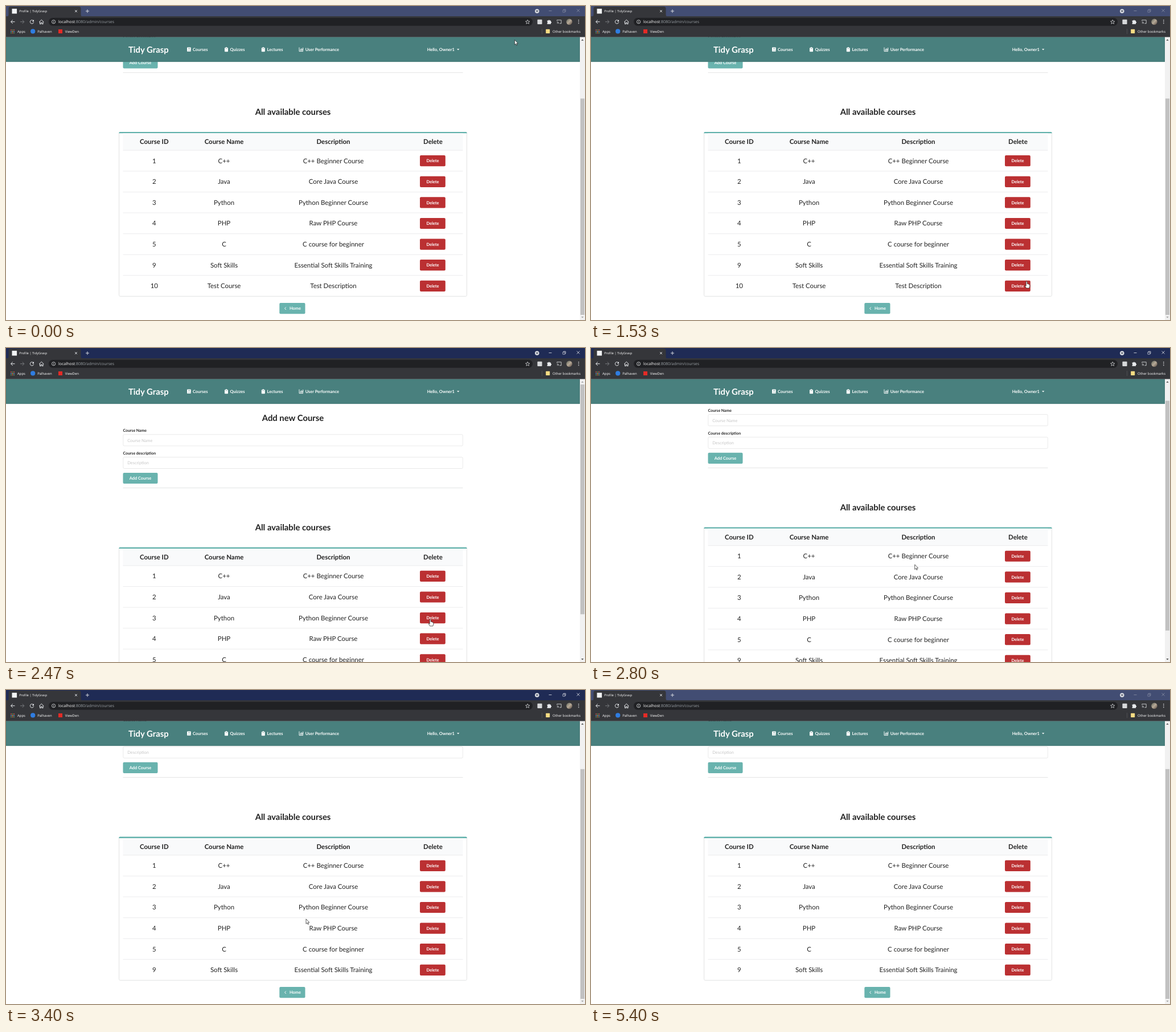
Write an HTML page that moves like this. It is 1017x551 px and loops after 5.54 s.

```html
<!DOCTYPE html>
<html lang="en">
<head>
<meta charset="utf-8">
<title>Course admin</title>
<style>
html, body { margin: 0; width: 100%; height: 100%; overflow: hidden; background: #fff; }
svg { display: block; width: 100%; height: 100%; }
text { font-family: Lato, sans-serif; white-space: pre; text-rendering: geometricPrecision; }
.ui { font-family: "Open Sans", "Noto Sans", sans-serif; }
.b { font-weight: 700; }
.m { text-anchor: middle; }
</style>
</head>
<body>
<svg id="stage" viewBox="0 0 1017 551" xmlns="http://www.w3.org/2000/svg"></svg>
<script>
const LOOP = 5540, FPS = 15;
const ROW = 36.6, HEAD = 381.9, VIEW = 496.5;
const TEAL = '#69b3ae', RED = '#bb3032', DARK_RED = '#a12225', INK = '#212121';
const LOCAL = 'localhost:8080/admin/courses';

const rect = (x, y, w, h, fill, more = '') =>
  `<rect x="${x}" y="${y}" width="${w}" height="${h}" fill="${fill}" ${more}/>`;
const circle = (x, y, r, fill, more = '') =>
  `<circle cx="${x}" cy="${y}" r="${r}" fill="${fill}" ${more}/>`;
const path = (d, fill, more = '') => `<path d="${d}" fill="${fill}" ${more}/>`;
const line = (d, color, w = 1, more = '') =>
  path(d, 'none', `stroke="${color}" stroke-width="${w}" ${more}`);
const text = (x, y, size, str, fill = INK, cls = '', more = '') =>
  `<text x="${x}" y="${y}" font-size="${size}" fill="${fill}" class="${cls}" ${more}>${str}</text>`;
const group = (id, body, more = '') => `<g id="${id}" ${more}>${body}</g>`;

function button(x, y, w, label, fill, id = '') {
  return rect(x, y, w, 19.2, fill, `rx="2" ${id && `id="${id}"`}`) +
    text(x + w / 2, y + 12.3, 7.42, label, '#fff', 'b m');
}

function field(label, hint, y) {
  return text(205.5, y - 4.8, 6.89, label, INK, 'b') +
    rect(205.8, y, 596.5, 20, '#fff', 'rx="2" stroke="#dadbdb" stroke-width=".6"') +
    text(213.2, y + 12.9, 7.42, hint, '#c6c6c6');
}

const courses = [
  [1, 'C++', 'C++ Beginner Course'],
  [2, 'Java', 'Core Java Course'],
  [3, 'Python', 'Python Beginner Course'],
  [4, 'PHP', 'Raw PHP Course'],
  [5, 'C', 'C course for beginner'],
  [9, 'Soft Skills', 'Essential Soft Skills Training'],
  [10, 'Test Course', 'Test Description']
];
const columns = [260.3, 383, 575, 750];

function cells(values, y, cls) {
  return values.map((v, i) => text(columns[i], y, 11.42, v, INK, cls)).join('');
}

function courseRow(course, i) {
  const y = HEAD + i * ROW;
  const last = i === courses.length - 1;
  return group('row' + i,
    line(`M205.5 ${y}H802.5`, '#e4e4e5', .7) +
    cells(course, y + 22.5, 'm') +
    button(727, y + 8.9, 44.8, 'Delete', RED, last ? 'target' : ''));
}

function page() {
  return text(504, 128, 14.83, 'Add new Course', INK, 'b m') +
    field('Course Name', 'Course Name', 151.8) +
    field('Course description', 'Description', 191.5) +
    button(205.5, 218.9, 61, 'Add Course', TEAL) +
    line('M205.5 245.5H802.5', '#dcdddd', .8) +
    text(504, 319.8, 14.83, 'All available courses', INK, 'b m') +
    rect(198.6, 350.5, 610.8, 0, '#fff', 'id="frame" rx="2" stroke="#d6d7d7" stroke-width=".7"') +
    path('M198.3 352v-.6q0-1.7 1.8-1.7h607.8q1.8 0 1.8 1.7v.6z', '#5fb0aa') +
    rect(205.5, 352, 597, HEAD - 352, '#f9fafb') +
    cells(['Course ID', 'Course Name', 'Description', 'Delete'], 371.1, 'b m') +
    courses.map(courseRow).join('') +
    group('home',
      rect(480.3, 0, 45.2, 19.2, TEAL, 'rx="2"') +
      line('M491.8 7.3l-2.2 2.3 2.2 2.3', '#fff', 1) +
      text(498, 12.3, 7.42, 'Home', '#fff', 'b'));
}

function clipboard(x) {
  return rect(x, 73.2, 6, 7, '#fff', 'rx=".8"') +
    rect(x + 1.7, 72.3, 2.6, 1.8, '#fff', 'rx=".7"') +
    line(`M${x + 1.4} 74.7h3.2`, '#49807e', .6);
}

function navbar() {
  const items = [[328, 'Courses'], [393.5, 'Quizzes'], [458.6, 'Lectures'], [525.7, 'User Performance']];
  return rect(0, 54.5, 1008, 43.5, '#49807e') +
    rect(.3, 54.9, 1007.4, 42.9, 'none', 'stroke="#41716f" stroke-width=".6"') +
    text(215, 82, 14.83, 'Tidy Grasp', '#fff', 'b') +
    items.map(([x, label]) => text(x, 79, 7.42, label, '#fff', 'b')).join('') +
    rect(318, 72.5, 6.8, 7.6, '#fff', 'rx="1"') +
    line('M320 74.2h3.4M320 75.6h3.4M319.2 78.6h5.6', '#49807e', .5) +
    clipboard(384) + clipboard(448.8) +
    line('M515 72.6v7h7', '#fff', .9) +
    line('M517 78.5v-2.6M518.6 78.5v-4.4M520.2 78.5v-3.2M521.6 78.5v-5.4', '#fff', 1) +
    text(739.7, 79, 7.42, 'Hello, Owner1', '#fff', 'b') +
    path('M792 75.2h4.4l-2.2 2.4z', '#fff');
}

function scrollbar() {
  return rect(1008, 54.5, 9, 496.5, '#f1f1f1') +
    path('M1010.3 60.8h4.4l-2.2-2.5z', '#505050', 'id="up"') +
    path('M1010.3 545h4.4l-2.2 2.5z', '#505050', 'id="down"') +
    rect(1009, 64, 7, 400, '#c1c1c1', 'id="thumb"');
}

function tabs() {
  return rect(0, 0, 1017, 18.5, '#1f2b55', 'id="strip"') +
    path('M1 18.5q3.5 0 3.5-3.5V4.5q0-3.5 3.5-3.5h120q3.5 0 3.5 3.5V15q0 3.5 3.5 3.5z', '#35363a') +
    rect(10.5, 4.8, 8.6, 8.6, '#f2f4f5', 'id="icon"') +
    circle(15, 9, 2.2, 'none', 'id="spinner" stroke="#85888d" stroke-width=".8" stroke-dasharray="9 5"') +
    text(23.2, 11.2, 5.6, '', '#fff', 'ui', 'id="tab"') +
    line('M121 7l4 4m0-4l-4 4', '#e4e6e9', .9) +
    line('M140 9h6M143 6v6', '#e4e6e9', .9) +
    circle(932.8, 9, 3.8, '#d3d6dc') + path('M930.8 8h4l-2 2.5z', '#333a4e') +
    group('controls',
      line('M953.5 8.5h5', 'currentColor', .7) +
      line('M978 7.2h3.8v3.8H978zM979.2 7.2V6h3.8v3.8h-1.2', 'currentColor', .6) +
      line('M1002.6 5.4l5 5m0-5l-5 5', 'currentColor', .7));
}

function toolbar() {
  const light = '#e8eaed';
  let dots = '';
  for (let i = 0; i < 9; i++) {
    const color = ['#e0584c', '#e5b43c', '#58a55c', '#5b8de0'][(i * 2 + (i / 3 | 0)) % 4];
    dots += rect(8.2 + i % 3 * 2.6, 41.4 + (i / 3 | 0) * 2.6, 1.6, 1.6, color);
  }
  const bookmark = (x, label) => text(x, 46.8, 5.97, label, '#fff', 'ui');
  return rect(0, 18, 1017, 36.5, '#35363a') +
    rect(75, 20.7, 850, 14, '#202124', 'rx="7"') +
    line('M15.5 27.7H8.6m3.2-3.2l-3.2 3.2 3.2 3.2', light, 1) +
    line('M25 27.7h6.9m-3.2-3.2l3.2 3.2-3.2 3.2', '#77797d', 1) +
    group('reload', line('M48 25.7a3.2 3.2 0 1 0 .7 2.7', light, 1) + path('M49 24v3.3h-3.3z', light)) +
    line('M42.6 25l5.6 5.6m0-5.6l-5.6 5.6', light, 1.1, 'id="stop"') +
    line('M58.2 28.2l4.1-4 4.1 4M59.5 27.5v4.1h1.9v-2.5h1.8v2.5h1.9v-4.1', light, 1) +
    circle(83.6, 27.7, 3.1, 'none', `stroke="${light}" stroke-width=".8"`) +
    line('M83.6 27.2v2.2M83.6 25.8v.8', light, .8) +
    text(92, 30.2, 6.97, LOCAL.replace(/:.*/, '<tspan fill="#9aa0a6">$&</tspan>'), '#fff', 'ui') +
    path('M916.2 24.2l1 2.5 2.7.2-2.1 1.7.7 2.7-2.3-1.5-2.3 1.5.7-2.7-2.1-1.7 2.7-.2z', 'none',
      `stroke="${light}" stroke-width=".7"`) +
    rect(933.4, 23.7, 8.2, 8.2, '#d7d9db', 'rx="1"') +
    path('M950.6 25.6h2a1.2 1.2 0 1 1 2.4 0h2v2a1.2 1.2 0 1 1 0 2.4v1.8h-6.4v-2a1.2 1.2 0 0 0 0-2.2z', light) +
    line('M967.8 26.2v-1.5h7.4v6h-2.7M967.8 27.8a3 3 0 0 1 3 3M967.8 29.6a1.2 1.2 0 0 1 1.2 1.2', light, .8) +
    circle(989.4, 27.7, 5.2, 'url(#photo)') +
    [24.9, 27.7, 30.5].map(y => circle(1005.8, y, .8, light)).join('') +
    dots + bookmark(20, 'Apps') +
    circle(47.2, 44.4, 4.1, '#2f7de1') + bookmark(55.2, 'Palhaven') +
    rect(92, 41, 7, 7, '#e32b26') + bookmark(103.7, 'ViewDen') +
    line('M941.5 40v9', '#5f6165', .6) +
    rect(948.2, 40.8, 7, 7.2, '#f6dc83', 'rx=".8"') +
    bookmark(960, 'Other bookmarks');
}

const outline = 'stroke="#1c1c1c" stroke-width=".7" stroke-linejoin="round"';
const $ = id => document.getElementById(id);
const set = (id, attrs) => {
  for (const key in attrs) $(id).setAttribute(key, attrs[key]);
};
const show = (id, on) => set(id, { display: on ? 'inline' : 'none' });

$('stage').innerHTML =
  `<defs><linearGradient id="photo" x2="1" y2="1"><stop stop-color="#5d6358"/>
   <stop offset=".5" stop-color="#b7aa98"/><stop offset="1" stop-color="#5a4c42"/></linearGradient></defs>` +
  rect(0, 0, 1017, 551, '#fff') +
  group('page', page()) + navbar() + scrollbar() + tabs() + toolbar() +
  group('cursor',
    path('M0 0V8.5L2 6.7 3.3 9.6 4.6 9 3.3 6.2H5.9Z', '#fff', `id="arrow" ${outline}`) +
    path('M-1 1a1 1 0 0 1 2 0V4.3Q2.6 3.9 3 5 4.1 4.6 4.4 5.6 5.6 5.4 5.6 6.8V9L4.6 11.9H-.6L-2.8 8.5Q-3.4 7.2-2.2 7.4L-1 8.4Z',
      '#fff', `id="hand" ${outline}`));

// Pointer stops: [tick, x, y]
const stops = [
  [0, 893.4, 59.5], [9, 744.4, 470], [12, 867.4, 389.5], [16, 867.4, 389.5],
  [21, 747, 472], [24, 771.5, 487], [36, 771.5, 487], [37, 745.2, 476],
  [40, 568.7, 380], [49, 568.7, 380], [58, 238.5, 553], [63, 238.5, 570],
  [64, 879.2, 550.2], [66, 879.2, 550.2], [67, 879, 570], [71, 894, 570],
  [72, 894.3, 550.2], [73, 953.3, 550.2], [74, 960, 570], [90, 960, 570]
];

function pointer(tick) {
  const i = stops.findIndex(s => s[0] > tick);
  const [t0, x0, y0] = stops[i - 1], [t1, x1, y1] = stops[i];
  const u = (tick - t0) / (t1 - t0), e = u * u * (3 - 2 * u);
  return [x0 + (x1 - x0) * e, y0 + (y1 - y0) * e];
}

function render(ms) {
  // Ticks start on times rounded to 10 ms, so lean slightly early.
  const tick = Math.floor(ms * FPS / 1000 + .1);
  const active = tick >= 26 && tick < 79;
  const loading = tick >= 27 && tick < 30;
  const reloaded = tick >= 30;
  const count = reloaded ? 6 : 7;
  const bottom = HEAD + count * ROW;
  const max = bottom - 509.4;
  const scroll = reloaded ? Math.min(max, Math.max(0, (tick - 40.15) * 19)) : max;

  set('page', { transform: `translate(0 ${-scroll})` });
  set('frame', { height: bottom - 350.5 });
  set('home', { transform: `translate(0 ${bottom + 11.7})` });
  show('row6', !reloaded);
  set('target', { fill: tick >= 24 ? DARK_RED : RED });

  const ratio = 478 / (VIEW + max);
  set('thumb', { y: 64 + scroll * ratio, height: VIEW * ratio });
  set('up', { fill: scroll > 0 ? '#505050' : '#a3a3a3' });
  set('down', { fill: scroll < max - .1 ? '#505050' : '#a3a3a3' });

  set('strip', { fill: active ? '#1f2b55' : '#424d73' });
  set('controls', { color: active ? '#fff' : '#9298ab' });
  set('tab', { 'font-size': loading ? 5.97 : 5.6 });
  $('tab').textContent = loading ? LOCAL : 'Profile | TidyGrasp';
  show('icon', !loading);
  show('spinner', loading);
  set('spinner', { transform: `rotate(${-tick * 40} 15 9)` });
  show('reload', !loading);
  show('stop', loading);

  const hand = tick >= 23 && tick < 30 || tick === 37;
  set('cursor', { transform: `translate(${pointer(tick)})` });
  show('hand', hand);
  show('arrow', !hand);
}

function loop() {
  render(performance.now() % LOOP);
  requestAnimationFrame(loop);
}
loop();
</script>
</body>
</html>
```
